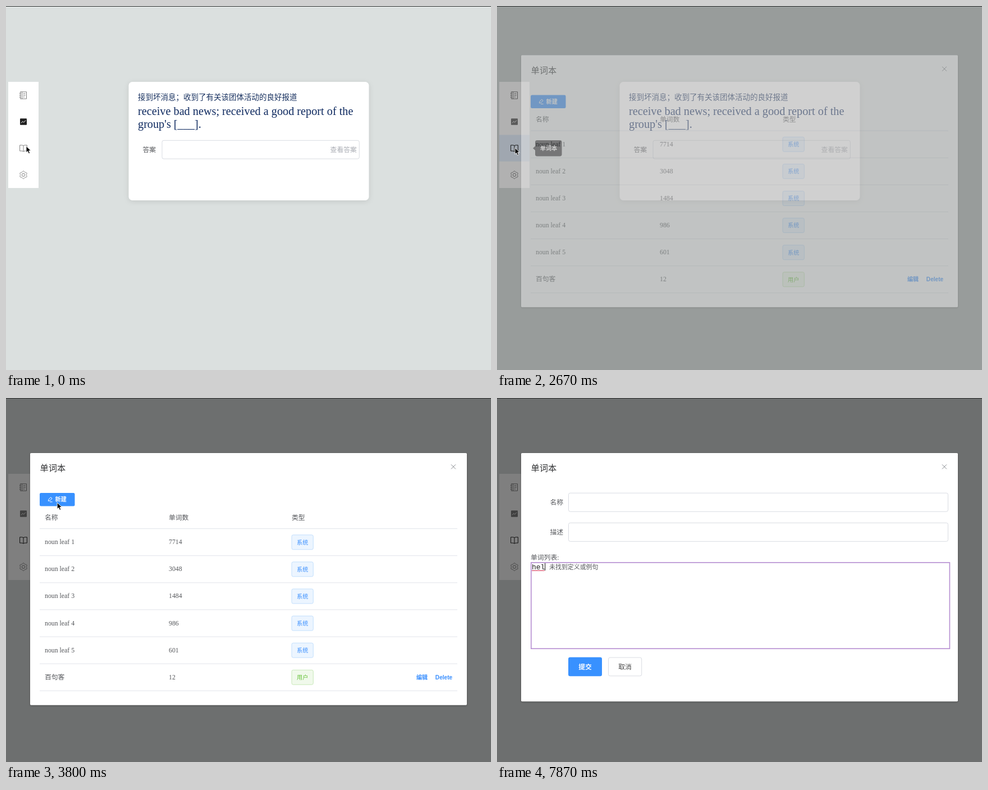
An HTML page that plays this animation: 864 by 648 pixels, repeating every 8000 ms.

```html
<!DOCTYPE html>
<html lang="zh-CN">
<head>
<meta charset="utf-8">
<title>Word book</title>
<style>
html, body { margin: 0; width: 100%; height: 100%; overflow: hidden; background: #dbe0df; }
svg { display: block; }
text { font: 11.81px "Liberation Serif", "Noto Sans CJK SC", serif; fill: #55575b; white-space: pre; }
.sans { font-family: "Liberation Sans", "Noto Sans CJK SC", sans-serif; }
.small { font-size: 10.125px; }
.bold { font-weight: 700; }
.med { font-weight: 500; }
.mid { text-anchor: middle; }
.white { fill: #fff; }
.blue { fill: #3a8ffe; }
.green { fill: #67c23a; }
.title { font-size: 15.19px; fill: #303133; }
.zh { font-size: 13.5px; fill: #17305f; }
.en { font-size: 20.25px; fill: #0f2a60; }
.mono { font: 13px "Liberation Mono", monospace; fill: #222; }
.field { fill: #fff; stroke: #d9dce2; }
.panel { fill: #fff; filter: drop-shadow(0 1px 1.5px rgba(0,0,0,.3)); }
.card { fill: #fff; filter: drop-shadow(0 2px 5px rgba(0,0,0,.1)); }
.icon { fill: none; stroke: currentColor; stroke-width: 1; }
.hover { fill: #e6f0fd; }
.pointer { fill: #000; stroke: #fff; stroke-width: .9; stroke-linejoin: round; }
</style>
</head>
<body>
<svg width="864" height="648" viewBox="0 0 864 648">
  <rect width="864" height="648" fill="#dbe0df"/>

  <rect class="card" x="218.5" y="135" width="428" height="211" rx="6.5"/>
  <text class="zh" x="235" y="166.5">接到坏消息；收到了有关该团体活动的良好报道</text>
  <text class="en" x="235" y="193.5">receive bad news; received a good report of the</text>
  <text class="en" x="235" y="217.3">group's [___].</text>
  <text x="243.5" y="259.7">答案</text>
  <rect class="field" x="278" y="239.3" width="351.3" height="32.8" rx="3"/>
  <text x="577.6" y="259.7" style="fill:#a9acb3">查看答案</text>

  <rect x="4" y="135" width="54" height="189" fill="#fff"/>
  <rect id="hoverBook" class="hover" x="4" y="229.5" width="54" height="47.2"/>
  <rect id="hoverGear" class="hover" x="4" y="276.7" width="54" height="47.3"/>
  <g id="notes" class="icon" transform="translate(31 159)">
    <path d="M-5.5-6.2H5.5V6.2H-5.5ZM-2.6-6.2V6.2M-7-3.4H-4.4M-7 0H-4.4M-7 3.4H-4.4M-.6-3H3.6M-.6 0H3.6M-.6 3H2"/>
  </g>
  <g id="chart" transform="translate(31 206)">
    <rect x="-6" y="-5.8" width="12" height="11.6" rx="1" fill="currentColor"/>
    <path d="M-4 2.4L-1.4-.6 .6 1.2 4-2.4" fill="none" stroke="#fff"/>
  </g>
  <path id="book" class="icon" transform="translate(31 253.4)"
    d="M0-4.7C-1.2-5.6-2.4-5.8-6.4-5.6V4.7C-2.4 4.5-1.2 4.7 0 5.8C1.2 4.7 2.4 4.5 6.4 4.7V-5.6C2.4-5.8 1.2-5.6 0-4.7V5.8"/>
  <g id="gear" class="icon" transform="translate(31 300.7)"><path/><circle r="2.7"/></g>

  <g id="tip">
    <rect x="68" y="239" width="47.5" height="28.5" rx="3.4" fill="#262728"/>
    <path d="M64 253.2L69 248.6V257.8Z" fill="#262728"/>
    <text class="sans small bold mid white" x="92" y="256.9">单词本</text>
  </g>

  <rect id="shade" width="864" height="648"/>

  <g id="dialog">
    <rect id="panel" class="panel" x="43" y="98" width="778" rx="1.7"/>
    <text class="title" x="60.5" y="130.4">单词本</text>
    <path d="M793 118.4L801 126.4M801 118.4L793 126.4" stroke="#85888e" fill="none"/>
    <g id="list">
      <rect id="add" x="60" y="169" width="62.5" height="23.6" rx="2.4"/>
      <path d="M75.3 183.4L76 180.6 79.6 176.6 82 178.8 78.4 182.7ZM78 184.9H82.6" fill="none" stroke="#fff"/>
      <text class="sans small bold white" x="87.6" y="184.3">新建</text>
    </g>
    <g id="form">
      <text x="94.4" y="189.8">名称</text>
      <rect class="field" x="127.5" y="169.2" width="676" height="33" rx="3"/>
      <text x="94.4" y="242.9">描述</text>
      <rect class="field" x="127.5" y="222.3" width="676" height="33" rx="3"/>
      <text x="60" y="288.2">单词列表:</text>
      <path id="area" d="M804 292.5H60.5V446.5H804" fill="none" stroke="#333"/>
      <rect id="ring" x="60.8" y="293" width="745.6" height="153.2" fill="none" stroke="#b993d3" stroke-width="1.7"/>
      <rect x="127" y="461.5" width="60" height="33.7" rx="3.2" fill="#3891ff"/>
      <text class="sans bold mid white" x="157" y="482.8">提交</text>
      <rect class="field" x="198.5" y="462" width="59.2" height="32.8" rx="3"/>
      <text class="sans med mid" x="228" y="482.8" style="fill:#444">取消</text>
      <text id="typed" class="mono" x="62" y="305"></text>
      <path id="spell" fill="none" stroke="#d9506a" stroke-width="1.3"/>
      <rect id="caret" y="294" width="1" height="13" fill="#111"/>
      <text id="hint" class="sans" y="304.8" style="font-size:10.95px">未找到定义或例句</text>
    </g>
  </g>

  <g id="cursor">
    <path id="arrow" class="pointer" d="M0 0V11.4L2.6 9 4.5 13.2 6.6 12.3 4.8 8.2H8.4Z"/>
    <path id="hand" d="M-1.2 1.2C-1.2-.5 1-.5 1.2 1V5L1.4 4.2C2-.0 0 4 1.4 3.8C2.6 3.2 3.4 3.6 3.6 4.6C4.6 3.8 5.6 4.2 5.8 5.2C7 4.8 7.8 5.4 7.8 6.6C7.8 9.5 7.3 10.5 6.4 12V13.7H.2V12.3L-3.6 7.8C-4.4 6.6-3 5.6-2 6.6L-1.2 7.4Z"
      fill="#fff" stroke="#111" stroke-linejoin="round"/>
    <path id="beam" d="M-2.5-6.5Q0-6.5 0-5V5Q0 6.5-2.5 6.5M2.5-6.5Q0-6.5 0-5M2.5 6.5Q0 6.5 0 5" fill="none" stroke="#222"/>
  </g>

  <rect width="864" height="1" fill="#2c2e2e"/>
</svg>
<script>
const LOOP = 8000;
const $ = id => document.getElementById(id);
const NS = 'http://www.w3.org/2000/svg';

function add(parent, tag, attrs, text = '') {
  const el = document.createElementNS(NS, tag);
  for (const k in attrs) el.setAttribute(k, attrs[k]);
  el.textContent = text;
  parent.appendChild(el);
}

function buildGear() {
  let d = '';
  for (let i = 0; i <= 72; i++) {
    const a = i * Math.PI / 36;
    const r = 6.1 + .7 * Math.cos(6 * a);
    d += (i ? 'L' : 'M') + (r * Math.sin(a)).toFixed(2) + ' ' + (r * Math.cos(a)).toFixed(2);
  }
  $('gear').firstChild.setAttribute('d', d + 'Z');
}

function buildList() {
  const list = $('list'), step = 48.1, top = 232.6;
  const cell = (x, y, s, c = '') => add(list, 'text', { x, y, class: c }, s);
  [[69, '名称'], [290, '单词数'], [509, '类型']].forEach(([x, s]) => cell(x, 216.7, s, 'med'));
  add(list, 'path', { d: `M60 ${top}H804`, stroke: '#e1e4ea' });
  [7714, 3048, 1484, 986, 601, 12].forEach((count, i) => {
    const own = i === 5, y = top + step * (i + .5);
    cell(69, y + 3.6, own ? '百句客' : 'noun leaf ' + (i + 1));
    cell(290, y + 3.6, String(count));
    add(list, 'rect', {
      x: 509, y: y - 12.9, width: 38.3, height: 26, rx: 2.6,
      fill: own ? '#f0f9eb' : '#ecf5ff', stroke: own ? '#c9e8b9' : '#c3dffd'
    });
    cell(528.2, y + 4, own ? '用户' : '系统', 'sans small med mid ' + (own ? 'green' : 'blue'));
    add(list, 'path', { d: `M60 ${top + step * (i + 1)}H804`, stroke: '#e1e4ea' });
    if (own) {
      cell(741, y + 3.8, '编辑', 'sans small bold mid blue');
      cell(780, y + 3.8, 'Delete', 'sans small bold mid blue');
    }
  });
}

// CSS "ease" curve
function ease(x) {
  if (x <= 0 || x >= 1) return x <= 0 ? 0 : 1;
  let lo = 0, hi = 1;
  for (let i = 0; i < 20; i++) {
    const u = (lo + hi) / 2;
    const bx = .75 * u * (1 - u) + u * u * u;
    if (bx < x) lo = u; else hi = u;
  }
  const u = lo;
  return .3 * u * (1 - u) * (1 - u) + 3 * u * u * (1 - u) + u * u * u;
}
const ramp = (t, start, length) => ease((t - start) / length);
const pulse = (t, on, off, length) => ramp(t, on, length) - ramp(t, off, length);

// time, x, y
const path = [
  [0, 36, 249.5], [70, 36, 249.5], [530, 39, 258], [670, 39, 259], [1000, 40.5, 261],
  [1140, 40.5, 261], [1470, 40, 298], [1800, 39, 306], [2330, 32, 252.5], [2850, 32, 252.5],
  [3200, 62, 214], [3500, 76, 196], [4070, 104, 178], [4530, 104, 176.5], [5000, 104, 176.5],
  [5300, 214, 408], [5530, 249, 372.3]
];
// time, pointer shape
const shapes = [[0, 'arrow'], [330, 'hand'], [2400, 'arrow'], [3870, 'hand'], [4400, 'arrow'], [5200, 'beam'], [7670, '']];
const keys = [[0, ''], [7670, 'h'], [7730, 'he'], [7870, 'hel']];
const blinks = [[0, 0], [5670, 1], [6330, 0], [6800, 1], [7330, 0], [7670, 1]];

const at = (table, t) => table.filter(row => row[0] <= t).pop()[1];

function place(t) {
  const i = path.findIndex(p => p[0] > t);
  if (i < 0) return path[path.length - 1].slice(1);
  const a = path[i - 1], b = path[i];
  const u = (t - a[0]) / (b[0] - a[0]), s = u * u * (3 - 2 * u);
  return [a[1] + (b[1] - a[1]) * s, a[2] + (b[2] - a[2]) * s];
}

const show = (id, on) => { $(id).style.display = on ? '' : 'none'; };
const fade = (id, v) => { $(id).style.opacity = v; };
const tint = (id, dark) => {
  const v = Math.round(130 - 98 * dark);
  $(id).style.color = `rgb(${v},${v},${v})`;
};

function render(t) {
  const book = pulse(t, 70, 1300, 250) + pulse(t, 2080, 3100, 250);
  const gear = pulse(t, 1300, 2080, 250);
  fade('hoverBook', book);
  fade('hoverGear', gear);
  tint('notes', 0);
  tint('chart', 1 - ramp(t, 70, 300));
  tint('book', t < 2600 ? book : 1);
  tint('gear', gear);
  fade('tip', pulse(t, 150, 1330, 200) + ramp(t, 2090, 200));

  const open = ramp(t, 2597, 300);
  fade('shade', .5 * ramp(t, 2600, 200));
  fade('dialog', open);
  $('dialog').setAttribute('transform', `translate(0 ${-17.5 * (1 - open)})`);

  const form = t >= 4330;
  $('panel').setAttribute('height', form ? 442.3 : 448.8);
  show('list', !form);
  show('form', form);
  const lit = pulse(t, 3820, 4330, 100);
  $('add').setAttribute('fill', `rgb(${56 + 46 * lit},${145 + 32 * lit},255)`);

  const focus = t >= 5670, word = at(keys, t), end = 62 + word.length * 7.8;
  show('area', !focus);
  show('ring', focus);
  $('typed').textContent = word;
  $('spell').setAttribute('d', word ? `M62 307.3H${end - .6}` : '');
  $('caret').setAttribute('x', end - .3);
  show('caret', at(blinks, t));
  $('hint').setAttribute('x', end + 7.6);
  show('hint', word);

  const [x, y] = place(t), shape = at(shapes, t);
  $('cursor').setAttribute('transform', `translate(${x} ${y})`);
  ['arrow', 'hand', 'beam'].forEach(id => show(id, id === shape));
}

buildGear();
buildList();
const start = performance.now();
function frame() {
  render((performance.now() - start) % LOOP);
  requestAnimationFrame(frame);
}
frame();
</script>
</body>
</html>
```
